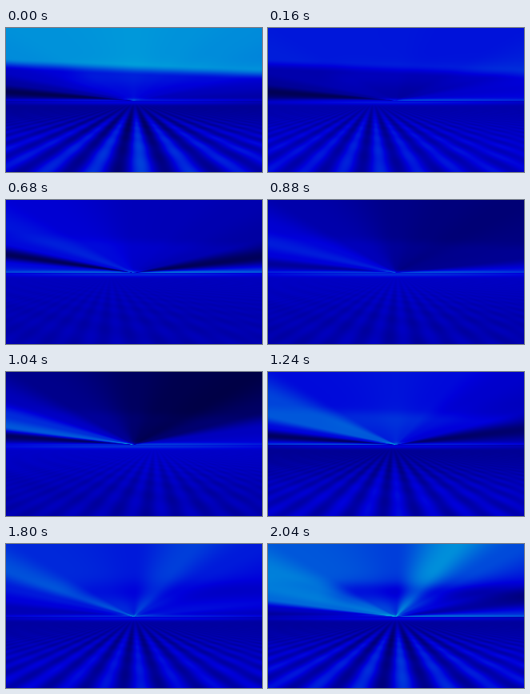
Write an HTML page with a canvas that moves like this. It is 320 by 180 pixels and loops after 2080 ms.

```html
<!DOCTYPE html>
<html lang="en">
<head>
<meta charset="utf-8">
<title>Blue horizon</title>
<style>
html, body { margin: 0; width: 100%; height: 100%; overflow: hidden; background: #00002d; }
canvas { display: block; width: 100vw; height: 100vh; }
</style>
</head>
<body>
<canvas id="stage" width="320" height="180"></canvas>
<script>
const W = 320, H = 180, LOOP = 2080, STEP = 40;
const CX = 160, HORIZON = 91;

// Directions of the sky rays in degrees, from the left horizon to the right one.
const ANGLES = [0, 4, 8, 13, 20, 32, 90, 130, 150, 165, 173, 180];

// rays: brightness per direction; top, mid: extra light by height;
// floor: far light, near light, stripe contrast, stripe origin x.
const POSES = [
  { at: 0, rays: [32, 10, 32, 42, 47, 49, 51, 49, 47, 44, 38, 32], top: 46, mid: 7, floor: [28, 44, 25, 160] },
  { at: 360, rays: [15, 12, 26, 27, 20, 13, 10, 9, 12, 25, 50, 72], top: -7, mid: 5, floor: [42, 45, 5, 95] },
  { at: 680, rays: [60, 50, 12, 50, 58, 50, 43, 42, 40, 36, 12, 66], top: -4, mid: 1, floor: [40, 36, 3, 130] },
  { at: 1040, rays: [38, 14, 76, 62, 42, 29, 17, 12, 10, 18, 40, 46], top: -3, mid: 1, floor: [43, 36, 6, 185] },
  { at: 1240, rays: [54, 14, 50, 76, 76, 57, 60, 57, 50, 45, 16, 38], top: -6, mid: 4, floor: [28, 40, 11, 155] },
  { at: 1560, rays: [50, 34, 13, 24, 65, 52, 50, 48, 47, 50, 70, 14], top: -6, mid: 1, floor: [33, 37, 9, 160] },
  { at: 2040, rays: [25, 42, 82, 88, 85, 72, 64, 90, 68, 52, 35, 64], top: 4, mid: -18, floor: [30, 44, 22, 160] }
];

const canvas = document.getElementById("stage");
const ctx = canvas.getContext("2d");
const picture = ctx.createImageData(W, H);
const mix = (a, b, k) => a + (b - a) * k;
const mixAll = (a, b, k) => a.map((v, i) => mix(v, b[i], k));
const smooth = (a, b, x) => {
  const k = Math.min(1, Math.max(0, (x - a) / (b - a)));
  return k * k * (3 - 2 * k);
};
const bell = (x, width) => Math.exp(-x * x / (width * width));

function skyPoint(x, y) {
  const angle = Math.atan2(HORIZON - y, CX - x) * 180 / Math.PI;
  let ray = 0;
  while (ray < ANGLES.length - 2 && angle > ANGLES[ray + 1]) ray++;
  return {
    ray,
    part: smooth(ANGLES[ray], ANGLES[ray + 1], angle),
    top: 1 - smooth(38, 53, y - x * 0.04),
    mid: bell(y - 60, 14) * smooth(60, 115, x),
    line: 24 * bell(y - 91, 2.6) * bell(x - CX, 190)
  };
}

const sky = [];
for (let y = 0; y < HORIZON; y++)
  for (let x = 0; x < W; x++) sky.push(skyPoint(x + 0.5, y + 0.5));

function poseAt(time) {
  let i = POSES.length - 1;
  while (POSES[i].at > time) i--;
  const a = POSES[i], b = POSES[(i + 1) % POSES.length];
  const k = (time - a.at) / ((b.at || LOOP) - a.at);
  return {
    rays: mixAll(a.rays, b.rays, k),
    top: mix(a.top, b.top, k),
    mid: mix(a.mid, b.mid, k),
    floor: mixAll(a.floor, b.floor, k)
  };
}

function setPixel(i, light) {
  const v = Math.min(100, Math.max(0, light));
  const p = i * 4;
  picture.data[p] = 0;
  picture.data[p + 1] = Math.max(0, (v - 48) * 3.1);
  picture.data[p + 2] = v < 48 ? 45 + v * 3.6 : 218;
  picture.data[p + 3] = 255;
}

function drawSky({ rays, top, mid }) {
  sky.forEach((s, i) => {
    const ray = mix(rays[s.ray], rays[s.ray + 1], s.part);
    setPixel(i, ray + top * s.top + mid * s.mid + s.line);
  });
}

function drawFloor([far, near, contrast, originX], time) {
  const frequency = 2.6 - contrast * 0.045;
  for (let y = HORIZON; y < H; y++) {
    const depth = y + 0.5 - HORIZON;
    const base = mix(far, near, smooth(0, 65, depth));
    const fade = smooth(0, 35, depth);
    const line = 20 * bell(depth - 2, 3);
    for (let x = 0; x < W; x++) {
      const u = (x - originX) / (depth + 1);
      const stripe = Math.cos((u - 0.1) * frequency * Math.PI * 2);
      const reach = Math.exp(-Math.abs(u) * 0.45);
      const ripple = Math.sin(1800 / (depth + 12) + u * 4 + time / LOOP * Math.PI * 8);
      const glow = line * bell(x - CX, 170);
      setPixel(y * W + x, base + stripe * contrast * fade * reach + ripple * fade * 1.2 + glow);
    }
  }
}

let shown = -1;
function frame(now) {
  const time = Math.floor(now % LOOP / STEP) * STEP;
  if (time !== shown) {
    shown = time;
    const pose = poseAt(time);
    drawSky(pose);
    drawFloor(pose.floor, time);
    ctx.putImageData(picture, 0, 0);
  }
  requestAnimationFrame(() => frame(performance.now() - start));
}
const start = performance.now();
frame(0);
</script>
</body>
</html>
```
